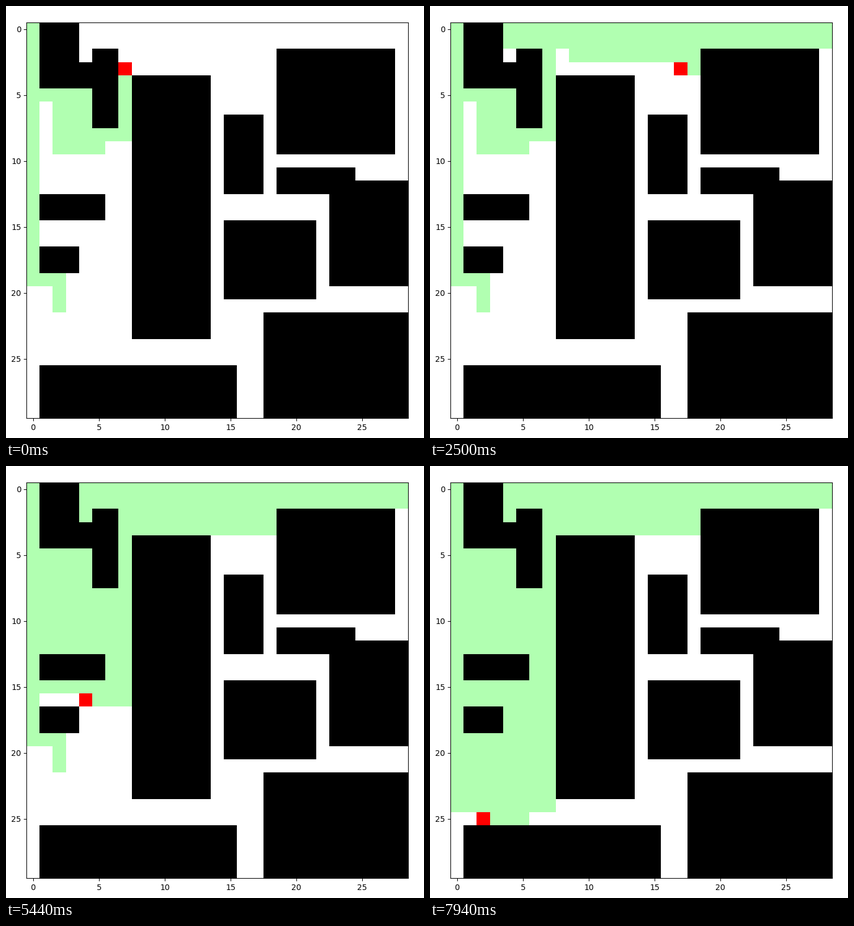
These frames come from a looping animation (737 by 760 pixels, 8 s). A matplotlib script:

```python
import numpy as np
import matplotlib.pyplot as plt
from matplotlib.animation import FuncAnimation
from matplotlib.colors import ListedColormap

W, H, DPI = 737, 760, 100
COLS, ROWS = 29, 30
CELL = 23.2
LEFT, TOP = 36.3, 29.3
FRAMES = 128
FREE, WALL, SEEN, ROBOT = range(4)

# Inclusive rectangles: first column, first row, last column, last row
WALLS = [
    (1, 0, 3, 4), (4, 3, 4, 4), (5, 2, 6, 7), (8, 4, 13, 23),
    (15, 7, 17, 12), (19, 2, 27, 9), (19, 11, 24, 12), (23, 12, 28, 19),
    (15, 15, 21, 20), (18, 22, 28, 29), (1, 26, 15, 29),
    (1, 13, 5, 14), (1, 17, 3, 18),
]
COVERED = [
    (0, 0, 0, 19), (1, 19, 2, 19), (2, 20, 2, 21), (1, 5, 4, 5),
    (2, 6, 4, 9), (5, 8, 5, 9), (6, 8, 7, 8), (7, 4, 7, 7),
]

START = (7, 3)
MOVES = """
U3 L3 D1 R4 U1 R20 D1 L19 D1 R9 D1 L10 U1 L1 U1 L3 D1 U1 R3 D8
D3 L6 U1 R5 U2 D1 L5 U4 L1 D9 R6 U2 R1 D3 L6 R3 D1 R3 D1 L3 D1 R3 D1 L3 D1
L1 U2 L2 D1 L1 D1 R1 D1 L1 D2 R4 U1 L3 U1 R4 U1 R2 D1 L2 D1 R2 D1 L2 D1 L3
"""
STEP = {"U": (0, -1), "D": (0, 1), "L": (-1, 0), "R": (1, 0)}

# The robot's pace varies a little: steps taken by certain ticks
TICKS = [0, 13, 16, 26, 39, 40, 56, 73, 101, 127]
TAKEN = [0, 20, 24, 40, 63, 64, 92, 121, 167, 209]


def walk(start, moves):
    x, y = start
    path = [(x, y)]
    for move in moves.split():
        dx, dy = STEP[move[0]]
        for _ in range(int(move[1:])):
            x, y = x + dx, y + dy
            path.append((x, y))
    return path


def fill(grid, rects, value):
    for x0, y0, x1, y1 in rects:
        grid[y0:y1 + 1, x0:x1 + 1] = value


base = np.full((ROWS, COLS), FREE)
fill(base, COVERED, SEEN)
fill(base, WALLS, WALL)
path = walk(START, MOVES)


def grid_at(tick):
    n = int(round(np.interp(tick, TICKS, TAKEN)))
    grid = base.copy()
    for x, y in path[:n]:
        grid[y, x] = SEEN
    x, y = path[n]
    grid[y, x] = ROBOT
    return grid


fig = plt.figure(figsize=(W / DPI, H / DPI), dpi=DPI, facecolor="white")
ax = fig.add_axes([LEFT / W, 1 - (TOP + ROWS * CELL) / H,
                   COLS * CELL / W, ROWS * CELL / H])
cmap = ListedColormap(["#ffffff", "#000000", "#b1ffb1", "#ff0000"])
image = ax.imshow(grid_at(0), cmap=cmap, vmin=0, vmax=3,
                  interpolation="nearest", aspect="auto")
ax.set_xticks(range(0, COLS, 5))
ax.set_yticks(range(0, ROWS, 5))
ax.tick_params(labelsize=10, labelfontfamily="DejaVu Sans")


def update(tick):
    image.set_data(grid_at(tick))
    return [image]


anim = FuncAnimation(fig, update, frames=FRAMES, interval=8000 / FRAMES,
                     repeat=True, repeat_delay=0)
plt.show()
```
